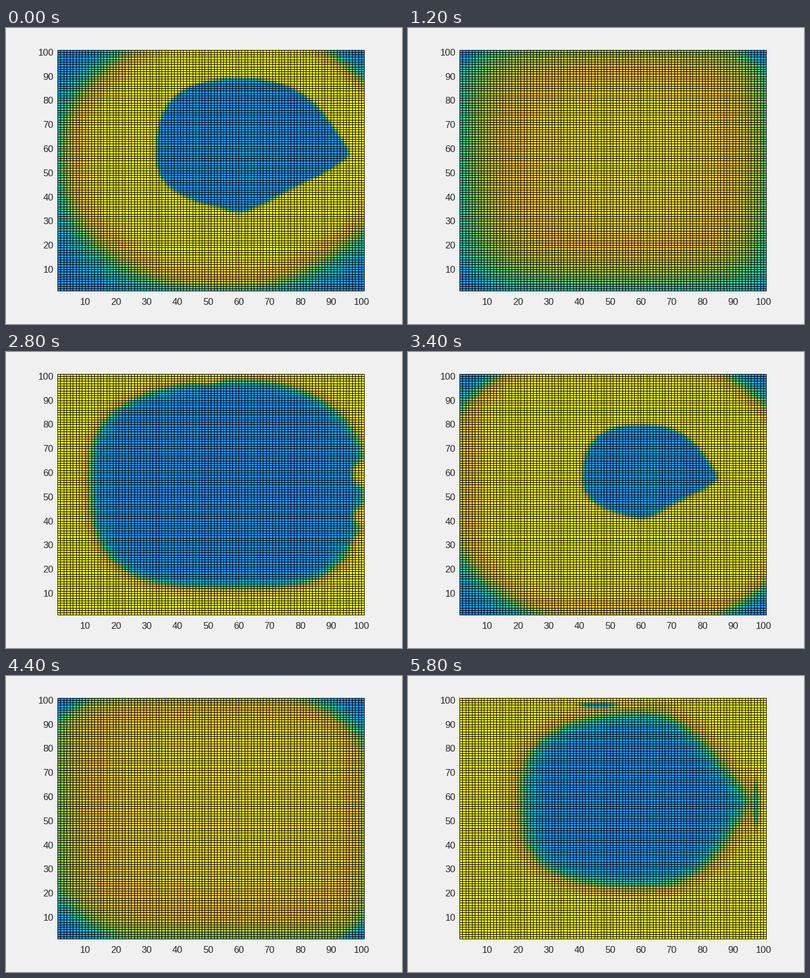
A matplotlib script that plays this animation: 700x525 px, repeating every 6 s.

```python
import numpy as np
import matplotlib.pyplot as plt
from matplotlib.animation import FuncAnimation
from matplotlib.colors import LinearSegmentedColormap

W, H, DPI = 700, 525, 100
FRAMES, STEP_MS = 30, 200
LOW = 0.33          # resting level of the medium
CENTER = (60, 58)

PARULA = LinearSegmentedColormap.from_list("parula", [
    "#3e26a8", "#4852f4", "#2e87f7", "#12b1d6",
    "#37c897", "#abc739", "#fec338", "#f9fb15"])

X, Y = np.meshgrid(np.arange(100) + 1.5, np.arange(100) + 1.5)
LEFT, RIGHT, BOTTOM, TOP = X - 1, 101 - X, Y - 1, 101 - Y
EDGES = (LEFT, BOTTOM, RIGHT, TOP)
CORNERS = (LEFT + BOTTOM, RIGHT + BOTTOM, LEFT + TOP, RIGHT + TOP)
DX, DY = X - CENTER[0], Y - CENTER[1]
DIST = np.hypot(DX, DY)
COS, SIN = DX / DIST, DY / DIST


def state(peak, depth, near, far, corners):
    """Peak level, edge depths (left, bottom, right, top), fall-off reach at
    left/bottom and right/top, corner sizes (BL, BR, TL, TR)."""
    return np.concatenate([[peak], np.broadcast_to(depth, 4), [near, far],
                           np.broadcast_to(corners, 4)]).astype(float)


FRESH = state(1, 0, 5, 2, .5)
RINGED = state(1.03, (.7, .65, .12, .1), 6.5, 2, (34, 28, 26, 15))
FULL = state(.985, (.58, .62, .38, .17), 7, 2.5, (21, 5, 12, 13))
FADED = state(1.03, .75, 24, 20, 3)
BRIGHT = state(1, (.2, .22, .15, .12), 6, 3, (17, 5, 7, 15))
DIMMED = state(.91, (.78, .75, .6, .7), 17, 7, (14, 9, 11, 20))


def spent(s):
    return np.concatenate([[LOW], s[1:]])


# Each generation of the wave: times and the states it moves between
REST = [(0, spent(FRESH))]
FIRST = [(0, RINGED), (3, FULL), (9, FADED), (13.5, spent(FADED))]
SECOND = [(14, FRESH), (16.5, (RINGED + BRIGHT) / 2), (19, BRIGHT),
          (25, DIMMED), (28.5, spent(DIMMED))]
THIRD = [(25, FRESH)]


def tween(keys, t):
    """Linear move between keyed arrays or numbers."""
    for (t0, a), (t1, b) in zip(keys, keys[1:]):
        if t0 <= t <= t1:
            return a + (b - a) * (t - t0) / (t1 - t0)
    return keys[0][1] if t < keys[0][0] else keys[-1][1]


def level(s):
    """Concentration that falls off towards the edges and corners."""
    near, far = s[5:7]
    f = np.ones_like(X)
    for d, depth, reach in zip(EDGES, s[1:5], (near, near, far, far)):
        f *= 1 - depth * np.exp(-d / reach)
    for d, size in zip(CORNERS, s[7:]):
        f *= 1 - np.exp(-(d / size) ** 3)
    return np.clip(LOW + (s[0] - LOW) * f, LOW, 1)


def blob(left, right, bottom, top, power, lean_x, lean_y):
    """Radius of a lopsided superellipse in the direction of each cell."""
    p = power + lean_x * COS + lean_y * SIN
    a = np.where(COS > 0, right, left)
    b = np.where(SIN > 0, top, bottom)
    return (np.abs(COS / a) ** p + np.abs(SIN / b) ** p) ** (-1 / p)


SMALL = blob(27, 36, 24.5, 31, 1.86, -.55, .5)
LARGE = blob(48.5, 41, 46, 40.5, 2.66, -.2, -.48)
EGG = blob(39, 35, 35.5, 37, 2.1, -.75, -.2)
GONE = -.2 * SMALL

FRONT = [(0, SMALL), (2.5, GONE), (8, GONE),
         (9, 3 * LARGE), (12, 1.2 * LARGE), (14, LARGE),
         (16.5, SMALL), (18.5, GONE), (24, GONE),
         (25, 3 * EGG), (27, 1.3 * EGG), (29, EGG)]
SOFTNESS = [(0, .35), (9, 1), (14, 1.4), (16.5, .4), (25, 1.5), (29, 2.3)]


def sources(t, tops, rights, size=2.2):
    """Small bright spots on the top and right borders."""
    return ([(t, x, 101, size, size, .96) for x in tops] +
            [(t, 101, y, size, size, .96) for y in rights])


# time, x, y, radii, level
SPOTS = (sources(9, (54, 62, 73), (66, 59, 47.5, 42)) +
         sources(14, (48, 51), (61, 58, 42, 30), 4) +
         sources(25, (6, 9, 36, 52, 56, 72, 82), (81.5, 64, 51.5)) +
         [(29, 46, 98, 6.5, 1.2, .4), (29, 66, 97.5, 7, 1, .7),
          (29, 97.5, 57, 1.2, 11, .55)])


def field(n):
    if n < 9:
        old, new = REST, FIRST
    elif n < 25:
        old, new = (FIRST if n < 15 else REST), SECOND
    else:
        old, new = SECOND, THIRD
    inner = level(tween(old, n))
    if old is REST:
        inner += .03 * np.exp(-(DIST / 18) ** 2)
    q = (DIST - tween(FRONT, n)) / tween(SOFTNESS, n)
    inside = 1 / (1 + np.exp(np.clip(q, -40, 40)))
    c = inside * inner + (1 - inside) * level(tween(new, n))
    for t, x, y, rx, ry, value in SPOTS:
        weight = max(0, 1 - abs(n - t) / 2.5)
        r2 = ((X - x) / rx) ** 2 + ((Y - y) / ry) ** 2
        c += weight * np.exp(-r2 ** 2) * (value - c)
    return c


fig = plt.figure(figsize=(W / DPI, H / DPI), dpi=DPI, facecolor="#f0f0f0")
x0, y0, w, h = 90.99, 58.51, .775 * W, .815 * H
ax = fig.add_axes([x0 / W, y0 / H, w / W, h / H])
ax.axis("off")
image = ax.imshow(field(0), cmap=PARULA, vmin=0, vmax=1, origin="lower",
                  extent=(1, 101, 1, 101), aspect="auto",
                  interpolation="nearest")
nodes = np.arange(1, 102)
style = dict(colors="black", linewidth=72 / DPI, antialiased=False,
             clip_on=False, snap=True)
ax.vlines(nodes, 1, 101, **style)
ax.hlines(nodes, 1, 101, **style)
ax.set_xlim(1, 101)
ax.set_ylim(1, 101)

font = dict(family="Liberation Sans", size=12, color="#262626",
            va="baseline")
for v in range(10, 101, 10):
    px = x0 + (v - 1) / 100 * w
    py = y0 + (v - 1) / 100 * h
    fig.text((px + .5) / W, (H - 491) / H, str(v), ha="center", **font)
    fig.text(84 / W, (py - 6) / H, str(v), ha="right", **font)


def update(n):
    image.set_data(field(n))
    return image,


anim = FuncAnimation(fig, update, frames=FRAMES, interval=STEP_MS,
                     repeat=True, repeat_delay=0)
plt.show()
```
